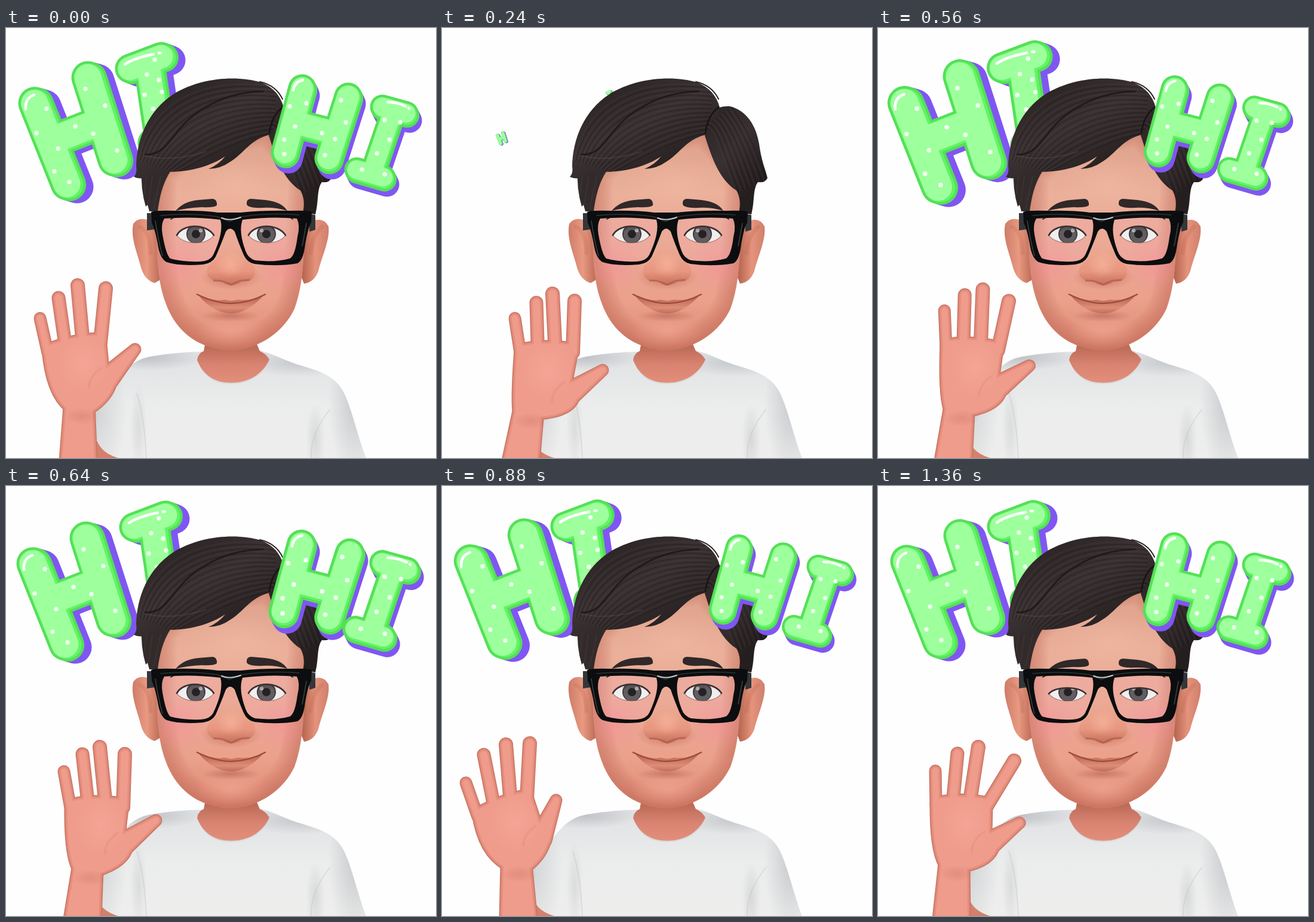
An HTML page with a canvas that plays this animation: 720 by 720 pixels, repeating every 1.44 s.

```html
<!DOCTYPE html>
<html lang="en">
<head>
<meta charset="utf-8">
<title>Waving avatar</title>
<style>
html, body { margin: 0; width: 100%; height: 100%; overflow: hidden; background: #fefefe; }
canvas { display: block; width: 720px; height: 720px; }
</style>
</head>
<body>
<canvas id="stage" width="720" height="720"></canvas>
<script>
const ctx = document.getElementById('stage').getContext('2d');
const STEP = 80, STEPS = 18;

// ---------- helpers ----------
const lerp = (a, b, k) => a + (b - a) * k;

function fill(d, style) {
  ctx.fillStyle = style;
  ctx.fill(new Path2D(d));
}
function line(d, style, width) {
  ctx.strokeStyle = style;
  ctx.lineWidth = width;
  ctx.stroke(new Path2D(d));
}
function clipped(d, draw) {
  ctx.save();
  ctx.clip(new Path2D(d));
  draw();
  ctx.restore();
}
function addStops(g, colors) {
  colors.forEach((c, i) => g.addColorStop(i / (colors.length - 1), c));
  return g;
}
const linear = (x0, y0, x1, y1, ...colors) => addStops(ctx.createLinearGradient(x0, y0, x1, y1), colors);
const radial = (x, y, r, ...colors) => addStops(ctx.createRadialGradient(x, y, 0, x, y, r), colors);

// Soft elliptical shade that fades out at its rim
function glow(x, y, rx, ry, rgb, alpha) {
  ctx.save();
  ctx.translate(x, y);
  ctx.scale(rx, ry);
  ctx.fillStyle = radial(0, 0, 1, `rgba(${rgb},${alpha})`, `rgba(${rgb},${alpha * .5})`, `rgba(${rgb},0)`);
  ctx.fillRect(-1, -1, 2, 2);
  ctx.restore();
}
function disc(x, y, r, style) {
  ctx.fillStyle = style;
  ctx.beginPath();
  ctx.arc(x, y, r, 0, 7);
  ctx.fill();
}

// ---------- lettering ----------
// Each letter: strokes, stroke width, shadow offset, pivot, gloss, dots
const letters = {
  bigH: {
    d: 'M48 126L102 261M137 83L181 221M78 188L160 156', w: 55, shadow: [17, 5], pivot: [98, 186],
    gloss: 'M33 136Q31 118 47 112', dots: [68,135, 51,176, 87,202, 81,240, 106,258, 133,102, 116,165, 166,130, 146,177, 186,205]
  },
  bigI: {
    d: 'M207 68L260 48M238 62L253 165M245 192L292 176', w: 49, shadow: [16, 6], pivot: [284, 113],
    gloss: 'M199 61Q215 50 247 44M256 42L259 42', dots: [249,53, 236,78, 256,87, 232,112, 261,107, 246,135]
  },
  smallH: {
    d: 'M496 101L467 208M573 115L540 218M486 159L552 176', w: 47, shadow: [6, 12], pivot: [523, 167],
    gloss: 'M481 104Q483 90 497 87', dots: [475,131, 503,126, 484,165, 466,187, 466,211, 529,176, 569,158, 551,186, 534,213, 561,121]
  },
  smallI: {
    d: 'M630 132L670 143M648 139L613 242M587 237L632 250', w: 41, shadow: [6, 12], pivot: [632, 199],
    gloss: 'M639 124Q656 124 669 131M674 134L675 135', dots: [660,158, 634,154, 642,187, 621,210, 596,237, 634,245]
  }
};
const bigScale = [1, 0, 0, .1, .7, 1.03, 1.09, 1.04, 1, 1.06, 1.03, 1.01];
const smallScale = [1, 0, 0, 0, 0, .1, .65, .98, 1.05, 1.06, 1, .96, .98];

function drawLetter({ d, w, shadow, pivot, gloss, dots }, scale, dx = 0, dy = 0) {
  if (!scale) return;
  ctx.save();
  ctx.translate(pivot[0] + dx, pivot[1] + dy);
  ctx.scale(scale, scale);
  ctx.translate(-pivot[0], -pivot[1]);
  const layer = (k, color, width) => {
    ctx.save();
    ctx.translate(shadow[0] * k, shadow[1] * k);
    line(d, color, width);
    ctx.restore();
  };
  for (const k of [1, .75, .5]) layer(k, '#8056f2', w);
  layer(.28, '#55df58', w);
  layer(0, '#55df58', w);
  layer(.25, '#61f563', w - 8);
  layer(0, '#61f563', w - 8);
  layer(0, '#9eff9d', w - 10);
  line(gloss, '#fff', 4.5);
  for (let i = 0; i < dots.length; i += 2) disc(dots[i], dots[i + 1], 3.7, '#efffef');
  ctx.restore();
}

// ---------- body ----------
const SHIRT = 'M328 542C290 543 252 547 230 553C200 563 177 600 157 633Q146 644 147 662L152 690Q160 712 188 720H603C589 684 580 641 566 611C552 583 526 575 500 567C465 557 450 546 425 540Z';
const NECK = 'M335 520L331 541Q322 544 320 556C330 582 350 594 377 594C410 594 432 576 441 555Q435 545 425 541L416 520Z';

function drawBody() {
  fill('M150 690L190 720H150Z', '#d5806f');
  fill(SHIRT, linear(0, 540, 0, 720, '#dfe1e3', '#ebecec', '#eeeeed'));
  clipped(SHIRT, () => {
    glow(150, 640, 52, 130, '170,174,180', .4);
    glow(585, 630, 45, 130, '170,174,180', .55);
    glow(240, 552, 90, 22, '160,164,170', .5);
    glow(490, 560, 90, 24, '170,174,180', .5);
    glow(222, 670, 14, 75, '165,168,172', .25);
    glow(518, 690, 16, 62, '165,168,172', .3);
    line('M219 612Q232 650 235 720M511 720Q509 681 542 639', 'rgba(190,193,195,.4)', 2);
  });
  line('M321 548C325 580 348 596 377 595C410 595 434 577 442 552', '#d7dadb', 2);
  fill(NECK, linear(0, 535, 0, 594, '#bd6c59', '#d98472', '#e38e7a'));
}

// ---------- head ----------
const FACE = 'M254 245L252 345C253 410 258 442 274 476C291 511 325 538 376 540C425 538 466 507 483 470C495 437 498 402 501 340L506 240L440 165L300 190Z';
const EAR_L = 'M243 324Q223 314 213 328C208 352 221 379 226 401Q232 422 249 427L259 421L252 340Z';
const EAR_R = 'M511 324Q531 315 540 332C543 354 529 382 523 407Q516 426 499 428L495 418L501 340Z';
const LENSES = 'M265 319Q313 315 359 321Q365 342 347 380Q342 390 326 391Q295 392 275 386Q268 380 262 346Q259 328 265 319Z'
  + 'M396 321Q443 315 487 319Q493 330 488 350Q484 382 475 386Q450 393 417 389Q405 385 401 373Q389 341 396 321Z';
const SKIN_EDGE = '176,92,78';

function drawEye(x, side, open) {
  const lid = lerp(362, 327, open);
  const ends = 347 + 4 * (1 - open);
  const upper = `M${x - 31} ${ends}C${x - 20} ${lid} ${x + 18} ${lid} ${x + 31} ${ends}`;
  if (open > .05) {
    const eye = `${upper}C${x + 20} 364 ${x - 19} 364 ${x - 31} ${ends}Z`;
    fill(eye, '#f1efee');
    clipped(eye, () => {
      disc(x - side, 345, 16, '#3d3a3c');
      disc(x - side, 346, 14, '#615d60');
      disc(x - side, 345, 7, '#252225');
      disc(x - side * 9, 339, 3.2, '#b5b1b4');
      glow(x, 332, 36, 9, '70,55,55', .45);
    });
    line(`M${x + 31} ${ends}C${x + 20} 364 ${x - 19} 364 ${x - 31} ${ends}`, 'rgba(110,65,60,.6)', 1.2);
  }
  line(upper, '#393032', open > .05 ? 2.6 : 3.5);
}

function drawGlasses() {
  const frame = 'M243 308Q250 305 282 306Q325 305 355 309H393Q432 305 476 306Q507 305 512 308L511 326Q506 333 501 362Q498 389 488 394Q455 400 416 395Q404 393 398 380Q389 359 383 341Q375 331 368 341Q359 365 351 383Q345 394 330 396Q290 399 269 392Q259 387 255 367Q250 338 244 326Z';
  fill('M236 310H248L250 337L236 339ZM508 311L518 313V338L508 341Z', '#34373a');
  ctx.fillStyle = '#0b0d0e';
  ctx.fill(new Path2D(frame + LENSES), 'evenodd');
  line('M259 314Q310 309 354 316L374 324L395 316Q440 309 491 313', '#303436', 1.5);
  line('M361 318Q374 324 393 317', '#c7caca', 2);
  line('M250 323Q256 361 262 381M503 327L496 365', '#3c4043', 1.6);
}

function drawFace(open) {
  fill(EAR_L, linear(213, 0, 258, 0, '#cf7d69', '#e99a82', '#bd6b56'));
  fill(EAR_R, linear(497, 0, 540, 0, '#b76650', '#e5937c', '#cf806c'));
  line('M224 333Q240 338 242 377', 'rgba(180,92,72,.2)', 7);
  line('M529 333Q514 345 510 377', 'rgba(180,92,72,.2)', 7);

  fill(FACE, linear(0, 190, 0, 540, '#dfa38d', '#ebb09a', '#eaaa96', '#eba18c', '#dc8a76'));
  clipped(FACE, () => {
    for (let width = 64; width > 4; width -= 6) line(FACE, `rgba(${SKIN_EDGE},.055)`, width);
    glow(287, 398, 52, 46, '246,140,152', .5);
    glow(462, 398, 52, 46, '246,140,152', .5);
    glow(377, 508, 60, 28, '246,170,152', .55);
    glow(390, 260, 85, 45, '241,186,165', .5);
  });
  fill(LENSES, 'rgba(246,170,180,.22)');

  // Nose and mouth
  glow(377, 417, 52, 22, '174,84,67', .55);
  fill('M362 358Q361 382 342 395C329 408 341 428 361 424Q377 438 395 424C414 428 424 408 412 395Q393 380 391 358Z', linear(0, 358, 0, 432, 'rgba(235,168,148,0)', '#eba38c', '#e8967f', '#c26e5a'));
  line('M348 423Q361 421 377 430Q391 421 407 422', 'rgba(160,74,58,.45)', 3);
  glow(376, 396, 24, 22, '250,186,164', .6);
  glow(376, 482, 50, 10, '165,80,65', .45);
  fill('M321 446Q350 459 365 455L377 457L389 455Q411 458 433 446Q404 478 377 478Q346 477 321 446Z', linear(0, 447, 0, 479, '#b9604f', '#c97562', '#dd8d78', '#bd6855'));
  line('M320 446Q350 461 377 461Q406 461 434 446', '#9b4c3d', 2.5);

  drawEye(317, -1, open);
  drawEye(437, 1, open);
  ctx.save();
  ctx.translate(0, 14 * (1 - open));
  fill('M284 306Q298 290 322 288L346 286Q354 287 353 297Q348 301 328 300Q304 301 284 306Z', '#302829');
  fill('M403 295Q402 286 411 286L434 288Q462 291 471 306Q451 300 430 301Q405 302 403 295Z', '#302829');
  ctx.restore();
  line('M276 320L285 315M480 320L473 315', '#2c2424', 2);
}

const HAIR_TOP = 'M214 249Q220 244 218 231C219 187 237 139 280 111C325 83 386 79 427 91Q457 103 465 133C462 152 452 166 440 179C409 187 398 210 377 223Q359 236 339 236Q357 228 367 215C340 233 299 244 258 240Q242 239 239 248Q224 255 214 249Z';
const HAIR_SIDE = 'M227 232L276 239C262 260 257 284 254 307L240 307L237 296L234 299Q225 270 227 232Z';
const HAIR_RIGHT = 'M440 180C444 148 453 130 481 131C510 137 526 164 531 194C535 224 541 234 545 251Q541 260 529 258C520 270 524 290 518 312L497 309Q502 288 493 272C464 254 451 215 440 180Z';

function drawHair() {
  fill(HAIR_SIDE, '#332b2b');
  fill(HAIR_RIGHT, linear(440, 150, 545, 240, '#2b2425', '#393032', '#241e1f'));
  fill(HAIR_TOP, linear(285, 95, 360, 235, '#2b2425', '#3b3233', '#292223'));
  const shades = ['rgba(82,71,71,.28)', 'rgba(18,14,15,.3)'];
  clipped(HAIR_TOP, () => {
    for (let i = 0; i < 24; i++) {
      const k = i / 23;
      line(`M${222 + 62 * k} ${220 + 23 * k}C${242 + 94 * k} ${125 + 90 * k} ${323 + 70 * k} ${80 + 105 * k} ${454 - 8 * k} ${98 + 78 * k}`, shades[i % 2], 1.5);
    }
    line('M233 212C276 213 276 166 332 134Q376 107 430 106', 'rgba(28,22,23,.8)', 3);
    line('M232 214Q279 225 335 207', 'rgba(98,84,82,.35)', 2);
  });
  clipped(HAIR_RIGHT, () => {
    for (let i = 0; i < 14; i++) {
      const k = i / 13;
      line(`M${443 + 42 * k} ${164 - 32 * k}C${458 + 50 * k} 165 ${467 + 63 * k} 211 ${493 + 50 * k} ${276 - 22 * k}`, shades[i % 2], 1.5);
    }
  });
  line('M425 90Q452 96 463 119', '#2c2425', 2);
  line('M463 133Q445 146 441 176', '#181314', 2.5);
  line('M235 248L231 283M245 249L238 298M259 249L247 303', 'rgba(80,67,66,.4)', 1.5);
}

// ---------- waving hand ----------
// wrist x,y; elbow x; little base; index base; thumb base; five tips from little finger to thumb
const left    = [123,634, 121, 70,538, 158,520, 168,588, 57,486, 88,452, 120,431, 167,436, 216,538];
const right   = [145,642, 132, 131,538, 219,537, 213,612, 122,486, 158,460, 185,445, 222,457, 269,573];
const lean    = [134,630, 120, 132,520, 215,540, 208,608, 154,459, 197,442, 231,441, 279,482, 260,582];
const middle  = [137,640, 128, 108,533, 196,532, 195,600, 97,478, 128,449, 157,437, 199,449, 251,560];
const farLeft = [125,634, 128, 60,548, 142,518, 165,588, 40,497, 70,450, 107,433, 147,431, 191,526];
const sweep   = [128,633, 123, 97,530, 182,530, 186,598, 96,477, 133,448, 168,437, 228,460, 237,564];
const wave = [[0, left], [3, right], [5, lean], [8, middle], [11, farLeft], [14, right], [17, sweep], [18, left]];

function poseAt(step) {
  const i = wave.findIndex(([at]) => at > step) - 1;
  const [t0, from] = wave[i], [t1, to] = wave[i + 1];
  const k = (1 - Math.cos(Math.PI * (step - t0) / (t1 - t0))) / 2;
  return from.map((v, n) => lerp(v, to[n], k));
}

function drawHand(pose) {
  const [wx, wy, ax, px, py, ix, iy, tx, ty, ...tips] = pose;
  const arm = `M${wx - 17} ${wy}L${ax - 22} 725H${ax + 22}L${wx + 16} ${wy}Z`;
  const palm = `M${px} ${py}Q${(px + ix) / 2} ${(py + iy) / 2 - 9} ${ix} ${iy}L${tx - 5} ${ty - 16}L${tx + 8} ${ty + 5}Q${tx + 2} ${ty + 30} ${wx + 16} ${wy + 4}L${wx - 17} ${wy}Q${lerp(px, wx, .3) - 10} ${lerp(py, wy, .75)} ${px} ${py}Z`;
  const thumb = `M${tx - 5} ${ty - 8}L${tips[8]} ${tips[9]}L${tx + 9} ${ty + 6}Z`;
  const fingers = [21, 23, 24, 24].map((width, n) => {
    const k = n / 3, bx = lerp(px, ix, k), by = lerp(py, iy, k) - 8 * Math.sin(Math.PI * k);
    return [`M${bx} ${by + 6}L${tips[2 * n]} ${tips[2 * n + 1]}`, width];
  });

  const pass = (color, inset) => {
    for (const d of [arm, palm, thumb]) {
      fill(d, color);
      line(d, color, 21 - inset);
    }
    for (const [d, width] of fingers) line(d, color, width - inset);
  };
  pass('#c57362', 0);
  pass('#dc8574', 2.5);
  pass('#e7907f', 6);
  pass('#ef9c8c', 11);
  const cx = (px + ix + tx + wx) / 4, cy = (py + iy + ty + wy) / 4;
  glow(cx, cy - 8, 43, 50, '250,171,157', .5);
  glow(wx + 4, wy + 16, 30, 14, '177,82,68', .2);
  line(`M${tx - 8} ${ty - 19}Q${tx - 28} ${ty - 6} ${tx - 29} ${ty + 14}`, 'rgba(201,109,92,.15)', 4);
}

// ---------- timeline ----------
const eyeOpen = { 12: .9, 13: .4, 14: 0, 15: 0, 16: .4, 17: .78 };

function draw(step) {
  ctx.fillStyle = '#fefefe';
  ctx.fillRect(0, 0, 720, 720);
  const big = bigScale[step] ?? 1, small = smallScale[step] ?? 1;
  // The two big letters bounce slightly apart on the rebound
  const apart = { 7: .5, 8: 1, 9: .5 }[step] ?? 0;
  drawLetter(letters.bigH, big, -3 * apart, 4 * apart);
  drawLetter(letters.bigI, big, 7 * apart, apart);
  drawBody();
  drawFace(eyeOpen[step] ?? 1);
  drawHair();
  drawGlasses();
  drawLetter(letters.smallH, small);
  drawLetter(letters.smallI, small);
  drawHand(poseAt(step));
}

ctx.lineCap = ctx.lineJoin = 'round';
const start = performance.now();
function tick() {
  draw(Math.floor((performance.now() - start) / STEP) % STEPS);
  requestAnimationFrame(tick);
}
tick();
</script>
</body>
</html>
```
